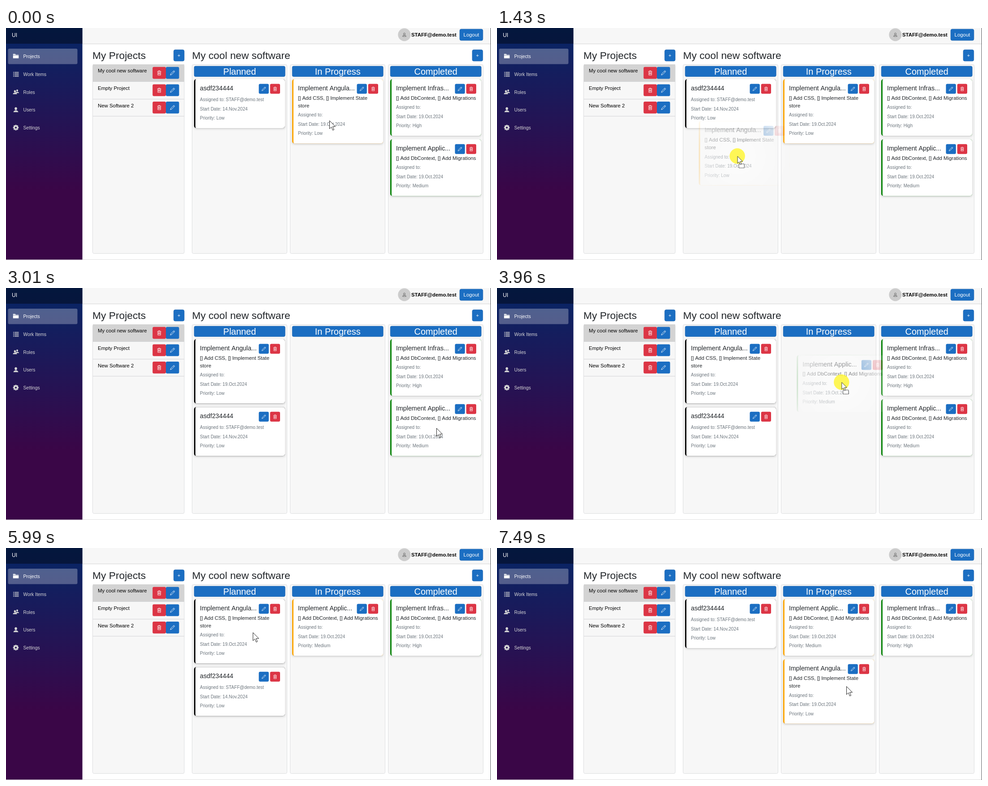
An HTML page with a canvas that plays this animation: 1083x517 px, repeating every 8000 ms.

```html
<!DOCTYPE html>
<html lang="en">
<head>
<meta charset="utf-8">
<title>Project board</title>
<style>
  html, body { margin: 0; width: 100%; height: 100%; overflow: hidden; background: #fff; }
  canvas { display: block; }
</style>
</head>
<body>
<canvas id="stage" width="1083" height="517"></canvas>
<script>
const W = 1083, H = 517, LOOP = 8000, STEP = 69;
const stage = document.getElementById('stage').getContext('2d');
const newLayer = () => Object.assign(document.createElement('canvas'), { width: W, height: H }).getContext('2d');
const page = newLayer(), ghost = newLayer();
let ctx = stage;

const BLUE = '#1b6ec2', EDGE = '#1861ac', RED = '#dc3545', INK = '#212529', MUTED = '#6c757d';
const PANEL = '#f7f7f7', LINE = '#dcdddf', NAV = '#d7d7d7';
const SMALL = 10, BODY = 11.4, ROW = 17.1;
const USER = 'STAFF@demo.test';
const COLS = [['Planned', '#000'], ['In Progress', '#ffa500'], ['Completed', '#008000']]
  .map(([name, color], i) => ({ name, color, x: 420 + 219 * i }));

const card = (title, desc, prio, who = '', date = '19.Oct.2024') => ({
  title, desc,
  info: ['Assigned to: ' + who, 'Start Date: ' + date, 'Priority: ' + prio],
  h: 109 + desc.length * ROW
});
const DB = ['[] Add DbContext, [] Add Migrations'];
const plain = card('asdf234444', [], 'Low', USER, '14.Nov.2024');
const angular = card('Implement Angula...', ['[] Add CSS, [] Implement State', 'store'], 'Low');
const infra = card('Implement Infras...', DB, 'High');
const applic = card('Implement Applic...', DB, 'Medium');

const BOARDS = [
  [[plain], [angular], [infra, applic]],
  [[angular, plain], [], [infra, applic]],
  [[angular, plain], [applic], [infra]],
  [[plain], [applic, angular], [infra]]
];
const DRAGS = [
  { press: 610, start: 810, drop: 1710, card: angular, grab: [725, 192] },
  { press: 3270, start: 3340, drop: 4170, card: applic, grab: [958, 308] },
  { press: 6250, start: 6460, drop: 7350, card: angular, grab: [560, 191] }
];
// Pointer moves: first step, last step, and where they lead
const HOME = [722, 206];
const MOVES = [
  [70, 140, 726, 193],
  [810, 1570, 523, 292],
  [1640, 1780, 508, 286],
  [2110, 2450, 702, 299],
  [2720, 3010, 961, 312],
  [3270, 4030, 766, 208],
  [4100, 4240, 749, 190],
  [4510, 4720, 727, 292],
  [5650, 5990, 551, 188],
  [6460, 6730, 688, 293],
  [6800, 7210, 760, 302],
  [7280, 7490, 780, 308]
];

const TRASH = new Path2D('M2 3.5h12M5.5 3V1.500h5V3M3.500 4v11h9V4M5.700 6v6.500M8 6v6.500M10.300 6v6.500');
const PENCIL = new Path2D('M12.3 1 15 3.7 5.5 13.2 1.2 14.8 2.8 10.5zM10.3 3l2.7 2.7');
const FOLDER = new Path2D('M0 2h6l2 2h8v1H0zM0 6h16v8.5H0z');
const ARROW = new Path2D('M0 0V18L4.2 14.2 7.2 21.3 10 20.1 7 13.2H13z');

function text(s, x, y, size, color = INK, align = 'left', weight = 400) {
  ctx.font = `${weight} ${size}px "Liberation Sans", Arial, sans-serif`;
  ctx.textAlign = align;
  ctx.fillStyle = color;
  ctx.fillText(s, x, y);
}

function rect(x, y, w, h, fill) {
  ctx.fillStyle = fill;
  ctx.fillRect(x, y, w, h);
}

function box(x, y, w, h, r, fill, stroke, line = 1) {
  ctx.beginPath();
  ctx.roundRect(x, y, w, h, r);
  ctx.fillStyle = fill;
  ctx.fill();
  if (!stroke) return;
  ctx.strokeStyle = stroke;
  ctx.lineWidth = line;
  ctx.stroke();
}

// Icons live on a 16 unit grid, placed by their centre
function icon(path, cx, cy, size, color, line) {
  ctx.save();
  ctx.translate(cx - size / 2, cy - size / 2);
  ctx.scale(size / 16, size / 16);
  ctx.fillStyle = ctx.strokeStyle = color;
  ctx.lineWidth = line;
  line ? ctx.stroke(path) : ctx.fill(path);
  ctx.restore();
}

function iconButton(path, x, y, w, h, color, size) {
  box(x, y, w, h, 3, color);
  icon(path, x + w / 2, y + h / 2, size, '#fff', 1.2);
}

function textButton(s, x, y, w, h) {
  box(x + .4, y + .4, w - .8, h - .8, 3.5, BLUE, EDGE, .7);
  text(s, x + w / 2, y + h / 2 + 4, BODY, '#fff', 'center');
}

function person(cx, cy, size, color, line) {
  const p = new Path2D();
  p.ellipse(8, 5, 3.5, 4, 0, 0, 7);
  p.moveTo(15, 15);
  p.ellipse(8, 15, 7, 5, 0, 0, Math.PI, true);
  p.closePath();
  icon(p, cx, cy, size, color, line);
}

function listIcon(cx, cy) {
  for (let y = cy - 5; y < cy + 5; y += 3) {
    rect(cx - 6, y, 2, 1.4, NAV);
    rect(cx - 3, y, 9.5, 1.4, NAV);
  }
}

function gear(cx, cy) {
  ctx.strokeStyle = NAV;
  ctx.lineWidth = 3;
  ctx.beginPath();
  ctx.arc(cx, cy, 3.5, 0, 7);
  for (let a = 0; a < 6; a += Math.PI / 4) {
    ctx.moveTo(cx + 4 * Math.cos(a), cy + 4 * Math.sin(a));
    ctx.lineTo(cx + 6.3 * Math.cos(a), cy + 6.3 * Math.sin(a));
  }
  ctx.stroke();
}

function sidebar() {
  const g = ctx.createLinearGradient(0, -5, 0, H);
  g.addColorStop(0, 'rgb(5,39,103)');
  g.addColorStop(.7, '#3a0647');
  rect(0, 0, 170.6, H, g);
  rect(0, 0, 170.6, 35, 'rgba(0,0,0,.4)');
  text('UI', 13, 19.5, 12.2, '#fff');
  box(4.5, 46, 155, 34.5, 3, 'rgba(255,255,255,.28)');
  ['Projects', 'Work Items', 'Roles', 'Users', 'Settings'].forEach((s, i) =>
    text(s, 38.5, 66.8 + i * 39.85, 10.26, i ? NAV : '#fff'));
  icon(FOLDER, 22, 62.5, 12.5, '#fff');
  listIcon(22, 103);
  person(25, 141, 9, NAV);
  person(20, 143, 10.5, NAV);
  person(22, 182, 12.5, NAV);
  gear(22, 222);
}

function topbar() {
  rect(171, 0, 912, 35, PANEL);
  rect(171, 35, 912, 1, '#d6d5d5');
  box(875.3, .8, 28.4, 28.4, 14.2, '#ccc');
  person(889.5, 15, 9, '#444', 1.3);
  text(USER, 905, 19.2, BODY, '#000', 'left', 700);
  textButton('Logout', 1012.7, 2, 52.6, 26.2);
}

function projects() {
  text('My Projects', 193, 69.3, 22.8);
  textButton('+', 374, 48, 24.4, 26.2);
  box(193.5, 81.5, 204.5, 421, 3, PANEL, LINE);
  rect(194, 81, 204, 38, '#d3d3d3');
  ['My cool new software', 'Empty Project', 'New Software 2'].forEach((s, i) => {
    const y = i * 38.6;
    rect(194, Math.round(119 + y), 204, 1, '#d4d5d7');
    text(s, 205, 99.4 + y, BODY, '#000');
    iconButton(TRASH, 327.3, 86.8 + y, 29.7, 26.4, RED, BODY);
    iconButton(PENCIL, 357, 86.8 + y, 29.5, 26.4, BLUE, BODY);
  });
}

function drawCard({ title, desc, info, h }, x, y, color, shadow) {
  const left = { x: 2, y: 5 };
  ctx.save();
  if (shadow) {
    ctx.shadowColor = 'rgba(0,0,0,.2)';
    ctx.shadowBlur = 4;
    ctx.shadowOffsetY = 1.5;
  }
  box(x, y, 203, h, 5, color);
  ctx.restore();
  box(x + 2.9, y, 200.1, h, [left, 5, 5, left], '#fff');
  text(title, x + 13, y + 25, 14.25);
  iconButton(PENCIL, x + 144.5, y + 10.6, 22.3, 22, BLUE, SMALL);
  iconButton(TRASH, x + 169.7, y + 10.6, 22.3, 22, RED, SMALL);
  desc.forEach((s, i) => text(s, x + 13, y + 45.6 + i * ROW, BODY));
  info.forEach((s, i) => text(s, x + 13, y + h - 59.8 + i * 20.5, SMALL, MUTED));
}

// Every card of a board with its place
const layout = lists => lists.flatMap((list, i) => {
  let y = 114;
  return list.map(c => {
    const spot = { card: c, x: COLS[i].x, y, color: COLS[i].color };
    y += c.h + 8;
    return spot;
  });
});

function board(lists) {
  text('My cool new software', 415.5, 69.3, 22.8);
  textButton('+', 1040.7, 48, 24.4, 26.2);
  for (const { name, x } of COLS) {
    box(x - 4.5, 81.5, 212, 421, 3, PANEL, LINE);
    box(x + .2, 85, 203, 23.3, 3, BLUE, EDGE, .7);
    text(name, x + 101.7, 104, 19.95, '#fff', 'center');
  }
  for (const s of layout(lists)) drawCard(s.card, s.x, s.y, s.color, true);
}

function drawPage(state) {
  ctx = page;
  rect(0, 0, W, H, '#fff');
  sidebar();
  topbar();
  projects();
  board(BOARDS[state]);
  rect(0, H - 1, W, 1, '#dcdcdc');
  rect(W - 1, 0, 1, H, '#55585c');
  ctx = stage;
}

function pointer(t) {
  let pos = HOME;
  for (const [from, to, x, y] of MOVES) {
    if (t < from) break;
    const steps = Math.round((to - from) / STEP) + 1;
    const u = Math.min(1, (Math.floor((t - from) / STEP + .15) + 1) / steps);
    const e = (1 - Math.cos(Math.PI * u)) / 2;
    pos = [pos[0] + (x - pos[0]) * e, pos[1] + (y - pos[1]) * e];
  }
  return pos;
}

// The dragged copy fades out radially from the pointer
function drawGhost(drag, state, x, y) {
  const s = layout(BOARDS[state]).find(s => s.card === drag.card);
  const fade = stage.createRadialGradient(x, y, 0, x, y, 130);
  fade.addColorStop(0, 'rgba(0,0,0,.65)');
  fade.addColorStop(1, 'rgba(0,0,0,0)');
  ctx = ghost;
  ctx.clearRect(0, 0, W, H);
  drawCard(s.card, s.x + x - drag.grab[0], s.y + y - drag.grab[1], s.color);
  ctx.globalCompositeOperation = 'destination-in';
  rect(0, 0, W, H, fade);
  ctx.globalCompositeOperation = 'source-over';
  ctx = stage;
  ctx.drawImage(ghost.canvas, 0, 0);
}

function drawPointer(x, y, dragging) {
  ctx.save();
  ctx.translate(x + .5, y + .5);
  ctx.fillStyle = '#fff';
  ctx.strokeStyle = '#222';
  ctx.lineWidth = 1;
  if (dragging) {
    ctx.fillRect(3, 17, 12, 9);
    ctx.setLineDash([2, 1]);
    ctx.strokeRect(3, 17, 12, 9);
    ctx.setLineDash([]);
    ctx.scale(.87, .87);
  }
  ctx.fill(ARROW);
  ctx.stroke(ARROW);
  ctx.restore();
}

let shown = -1;
function frame(t) {
  const state = DRAGS.filter(d => t >= d.drop).length;
  if (state !== shown) drawPage(shown = state);
  ctx.drawImage(page.canvas, 0, 0);
  const [x, y] = pointer(t);
  const held = DRAGS.find(d => t >= d.press && t < d.drop);
  const dragging = held && t >= held.start;
  if (dragging) drawGhost(held, state, x, y);
  if (held) box(x - 17.3, y - 17.3, 34.6, 34.6, 17.3, 'rgba(255,245,45,.8)');
  drawPointer(x, y, dragging);
}

const start = performance.now();
function tick() {
  frame((performance.now() - start) % LOOP);
  requestAnimationFrame(tick);
}
tick();
</script>
</body>
</html>
```
